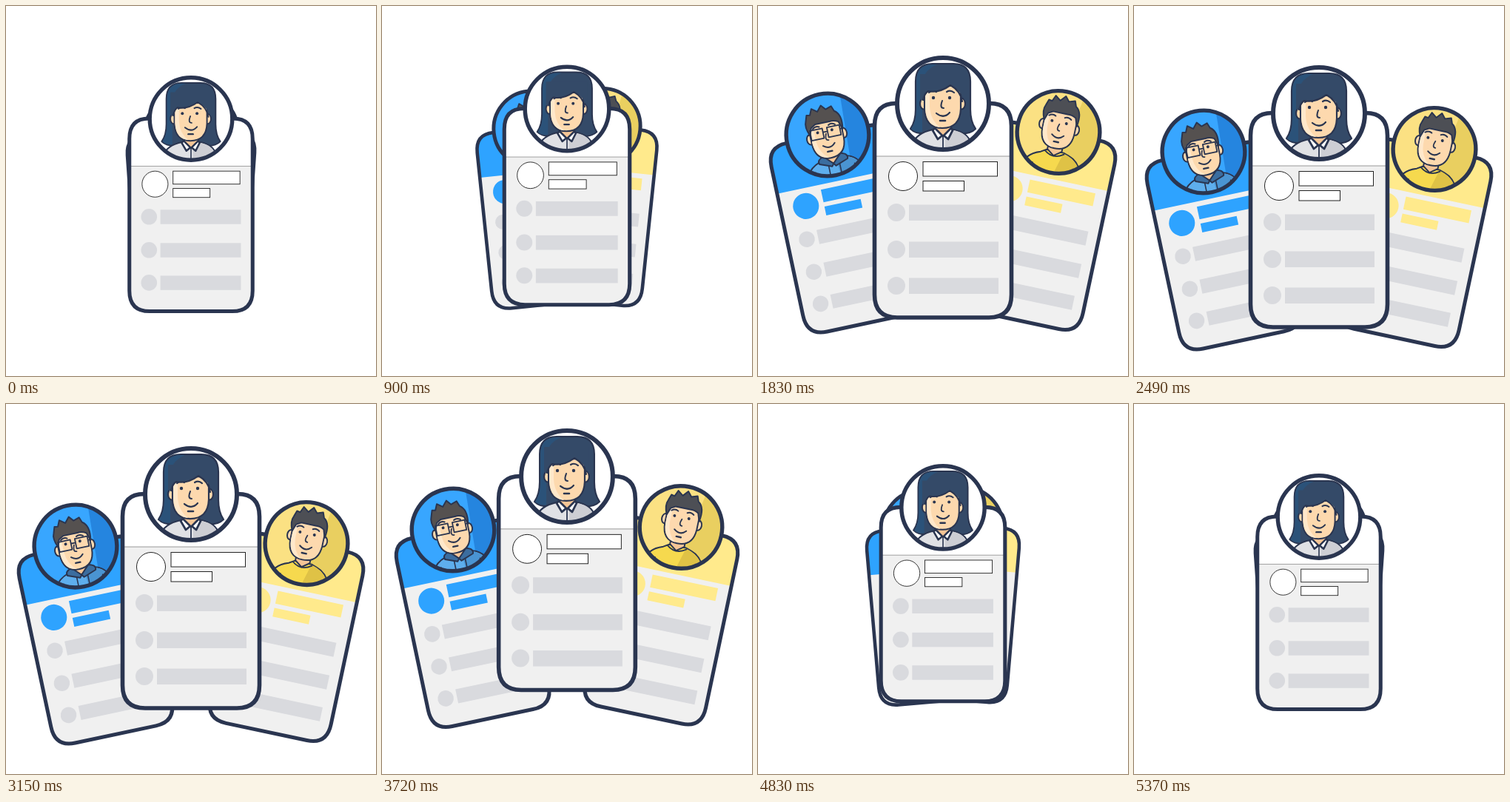
Animation, 500 px wide and 500 px high, one loop 5430 ms. Source, as an HTML page:

```html
<!DOCTYPE html>
<html>
<head>
<meta charset="utf-8">
<style>
html, body { margin: 0; width: 100%; height: 100%; overflow: hidden; background: #fff }
svg { display: block; width: 100vw; height: 100vh }
</style>
</head>
<body>
<svg id="stage" viewBox="0 0 500 500"></svg>
<script>
const INK = '#2a3550', SKIN = '#fdd9ae';
const LOOP = 5430, STEP = 30;

const path = (d, fill = 'none', w = 2.2) =>
  `<path d="${d}" fill="${fill}" stroke="${w ? INK : 'none'}" stroke-width="${w}" stroke-linejoin="round" stroke-linecap="round"/>`;
const rect = (x, y, w, h, fill, extra = '') =>
  `<rect x="${x}" y="${y}" width="${w}" height="${h}" fill="${fill}" ${extra}/>`;
const circle = (x, y, r, fill, extra = '') =>
  `<circle cx="${x}" cy="${y}" r="${r}" fill="${fill}" ${extra}/>`;

const CARD = 'M-63-.5H63Q92.5-.5 92.5 30V258Q92.5 289 62 289H-62Q-92.5 289-92.5 258V30Q-92.5-.5-63-.5Z';

// Ears, face and features; the face is centred on the badge.
function face(eyeY = -8) {
  const ear = x => `<ellipse cx="${x}" cy="0" rx="5" ry="7.5" fill="${SKIN}" stroke="${INK}" stroke-width="2.2"/>`;
  return ear(-26) + ear(25) +
    path('M-25-24V7Q-24 33-1 33Q23 33 24 7V-24Z', SKIN) +
    path('M-24-20V7Q-22 30-4 32Q-17 22-18 4V-20Z', '#ffe8cb', 0) +
    circle(-13, eyeY, 2.2, INK) + circle(9, eyeY, 2.2, INK) +
    path(`M-19 ${eyeY - 7}q5-4 10-1M5 ${eyeY - 8}q5-3 10 1`) +
    path('M-1-4Q-5 6 1 6', 'none', 2) +
    path('M-9 13Q1 21 9 12') + path('M-4 23H3', 'none', 2.6);
}

const SPIKES = 'M-25-6Q-31-20-27-28L-24-37L-19-36L-15-45L-7-39L0-47L6-40L15-43L18-35Q29-28 25-6L21-18Q14-22 8-21H-14L-21-17Z';
const NECK = path('M-11 22V36L0 44L11 36V22Z', '#f4c596');

const woman =
  path('M-37-30Q-37-54-14-54H14Q37-54 37-30V8Q37 24 44 34Q36 42 20 40H-20Q-36 42-44 34Q-37 24-37 8Z', '#344a68') +
  path('M-36-30Q-36-53-14-53H-8Q-30-44-28-20V38Q-37 40-43 34Q-36 24-36 8Z', '#2b5279', 0) +
  path('M-42 68V56Q-37 40-14 35H14Q33 39 37 52L42 68Z', '#e0e1e5') +
  path('M3 42L15 36Q33 40 36 53L41 68H3Z', '#cdced4', 0) +
  NECK + face() +
  path('M-31-6V-40H30V-3Q26-16 10-25Q-5-14-20-17Q-25-12-26-4Z', '#344a68', 0) +
  path('M-27-5Q-25-14-20-17Q-5-14 10-25Q24-17 26-3') +
  path('M-11 33L-1 43L-7 48L-14 36ZM11 33L1 43L7 48L13 36Z', '#fff', 2.8) +
  path('M0 44V64', 'none', 1.8);

const student =
  path('M31-64H64V64H25Z', '#2585df', 0) +
  path('M-45 70Q-43 46-20 38L-12 33H14L23 37Q42 43 47 70Z', '#5eaeed') +
  path('M5 40L23 38Q41 44 46 70H8Z', '#4a94d2', 0) + NECK +
  path('M-13 31Q-24 34-21 41L-3 48L0 44ZM13 31Q25 34 22 41L3 48L0 44Z', '#3b6d9f') +
  path('M-8 47V60M9 46V60M-29 52V64M31 50V64', 'none', 1.8) +
  `<g transform="translate(-1 2)">${face()}${path(SPIKES, '#555150')}` +
  path('M-24-13H-5V2H-24ZM2-13H21V2H2ZM-5-7H2M-24-7H-27M21-7H25', 'none', 2) + '</g>';

const runner =
  path('M28-64H70V64H5Z', '#e9cf60', 0) +
  path('M-48 70Q-45 42-20 34L-12 29H14L23 32Q43 38 50 70Z', '#f6d94e') +
  path('M14 30Q43 36 49 70H3Z', '#dfc246', 0) +
  `<g transform="translate(0 -8)">${NECK}${face(-7)}${path(SPIKES, '#4d4f55')}</g>` +
  path('M-14 31Q0 42 15 31M-29 52V66M33 50V66', 'none', 2);

function card(id, tint, badge, avatar, line) {
  const thin = line ? `stroke="#222" stroke-width="1"` : '';
  let rows = '';
  for (const y of [147, 197, 246])
    rows += circle(-63, y, 12, '#d9dade') + rect(-46, y - 10.5, 121, 21.5, '#d9dade');
  return `<g id="${id}">${path(CARD, '#f0f0f0', 0)}
    <g clip-path="url(#body)">${rect(-95, -5, 190, 76, tint)}</g>
    ${line ? rect(-92, 70.5, 184, 1, '#999') : ''}
    ${circle(-54, 98, 19.5, tint, thin)}
    ${rect(-27, 78.5, 100.5, 19.5, tint, thin)}${rect(-27, 104.5, 55.5, 13.5, tint, thin)}
    ${rows}${path(CARD, 'none', 5.6)}
    ${circle(0, 0, 62, badge)}<g clip-path="url(#disc)">${avatar}</g>
    ${circle(0, 0, 62, 'none', `stroke="${INK}" stroke-width="6"`)}</g>`;
}

stage.innerHTML =
  `<clipPath id="disc"><circle r="61"/></clipPath><clipPath id="body"><path d="${CARD}"/></clipPath>` +
  card('left', '#2ea3ff', '#38a6ff', student) +
  card('right', '#ffea8c', '#fbe183', runner) +
  card('mid', '#fff', '#fff', woman, true);

// Smooth curve through [time, value] points, flat at both ends.
function curve(...pts) {
  const slope = i => {
    const a = pts[i - 1], b = pts[i], c = pts[i + 1];
    if (!a || !c || (b[1] - a[1]) * (c[1] - b[1]) <= 0) return 0;
    return (c[1] - a[1]) / (c[0] - a[0]);
  };
  return t => {
    let i = 0;
    while (i < pts.length - 2 && t > pts[i + 1][0]) i++;
    const [t0, v0] = pts[i], [t1, v1] = pts[i + 1], h = t1 - t0;
    const u = Math.min(1, (t - t0) / h), w = 1 - u;
    return v0 * w * w * (1 + 2 * u) + v1 * u * u * (3 - 2 * u) +
      h * u * w * (slope(i) * w - slope(i + 1) * u);
  };
}

const midY = curve([0, 152.5], [570, 147], [900, 139], [1140, 132], [1530, 126], [1830, 132],
  [2490, 145], [2850, 137], [3420, 108], [3720, 98], [3990, 102], [4410, 122.5], [4560, 129],
  [5130, 150.5], [5370, 152.5]);
const sideY = curve([0, 172], [900, 166], [1300, 163], [1830, 174], [2280, 191], [2490, 197],
  [2750, 200], [3420, 183], [3720, 170], [4130, 161], [4410, 162], [5370, 172]);
const sideX = curve([0, 237], [570, 225], [900, 202], [1140, 168], [1380, 124], [1650, 98],
  [1830, 94], [3500, 94], [3720, 96], [3990, 124], [4410, 191], [4560, 206], [5130, 233], [5370, 237]);

function place(id, x, y, angle, scale) {
  document.getElementById(id).setAttribute('transform',
    `translate(${x} ${y}) rotate(${angle}) scale(${scale})`);
}

function draw(now) {
  const t = Math.min(5370, Math.floor(now % LOOP / STEP) * STEP);
  const x = sideX(t), y = sideY(t), spread = (237 - x) / 143;
  const scale = .9 + .1 * spread ** 1.3, angle = 4 + 8 * spread;
  place('left', x, y, -angle, scale * .9);
  place('right', 500 - x, y - 3.5, angle, scale * .9);
  place('mid', 250, midY(t), 0, scale);
}

const start = performance.now();
(function tick() {
  draw(performance.now() - start);
  requestAnimationFrame(tick);
})();
</script>
</body>
</html>
```
